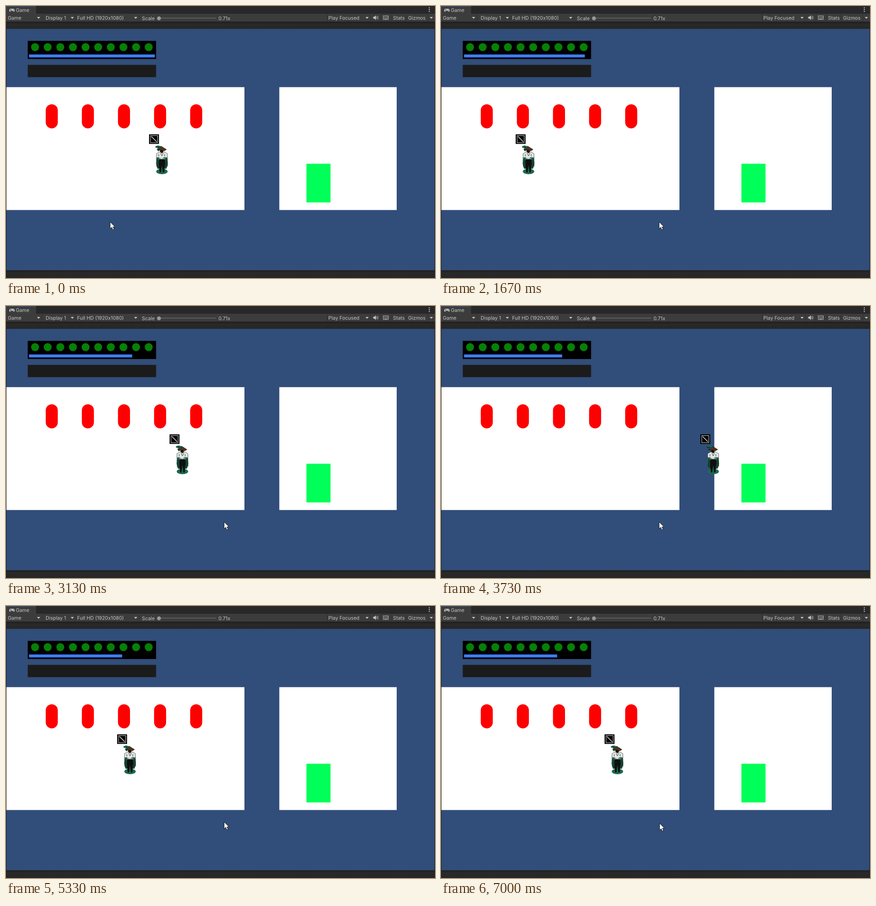
Write an HTML page that moves like this. It is 941 by 595 pixels and loops after 8000 ms.

```html
<!DOCTYPE html>
<html lang="en">
<head>
<meta charset="utf-8">
<title>Game view</title>
<style>
html, body { margin: 0; width: 100%; height: 100%; overflow: hidden; background: #282828; }
svg { display: block; width: 941px; height: 595px; }
text { font: 10.8px Inter, Roboto, sans-serif; fill: #c4c4c4; white-space: pre; }
</style>
</head>
<body>
<svg viewBox="0 0 941 595" xmlns="http://www.w3.org/2000/svg">
  <defs>
    <linearGradient id="shade" x2="0" y2="1">
      <stop offset="0" stop-color="#202020"/>
      <stop offset=".35" stop-color="#292929"/>
      <stop offset="1" stop-color="#262626"/>
    </linearGradient>
    <path id="drop" d="M-3.5 24h7l-3.5 4z" fill="#c4c4c4"/>
  </defs>

  <!-- window chrome -->
  <rect width="941" height="595" fill="#282828"/>
  <rect width="66" height="17" fill="#3c3c3c"/>
  <rect width="66" height="1" fill="#2c5d87"/>
  <rect y="17" width="941" height="17" fill="#3c3c3c"/>
  <rect y="34" width="941" height="1" fill="#232323"/>
  <rect y="35" width="941" height="15" fill="url(#shade)"/>
  <rect y="578" width="941" height="17" fill="url(#shade)"/>
  <path d="M.5 35v560M940.5 35v560" stroke="#1c1c1c"/>
  <path d="M10 6h6q2.500 0 2.800 3.500q.2 3-1.300 3q-1 0-2-2h-5q-1 2-2 2q-1.500 0-1.300-3Q7.500 6 10 6z" fill="#c4c4c4"/>
  <path d="M9 8.500h3M10.500 7v3M15 7.700h1.200M16 9.300h1.200" stroke="#3c3c3c"/>
  <path d="M928.500 4v9" stroke="#c4c4c4" stroke-width="2.400" stroke-linecap="round" stroke-dasharray="0 4"/>
  <path d="M79.500 17v17m72-17v17m141-17v17m412-17v17m95-17v17m23-17v17m23-17v17m32-17v17m48-17v17" stroke="#303030"/>
  <use href="#drop" x="71.500"/>
  <use href="#drop" x="145.500"/>
  <use href="#drop" x="284.500"/>
  <use href="#drop" x="792"/>
  <use href="#drop" x="933"/>
  <text x="21.500" y="13">Game</text>
  <text x="4" y="30">Game</text>
  <text x="87" y="30">Display 1</text>
  <text x="156" y="30">Full HD (1920x1080)</text>
  <text x="298" y="30.500">Scale</text>
  <text x="466" y="30.500">0.71x</text>
  <text x="707" y="30">Play Focused</text>
  <text x="849" y="30">Stats</text>
  <text x="882" y="30">Gizmos</text>
  <path d="M335 26.500H461" stroke="#5e5e5e" stroke-width="2"/>
  <circle cx="335.500" cy="27" r="4.300" fill="#999"/>
  <path d="M805.500 23.500h2.500l3.500-3v10l-3.500-3h-2.500z" fill="#c4c4c4"/>
  <path d="M813 23q1.500 2.500 0 5M815 21.500q2.500 4 0 8" fill="none" stroke="#c4c4c4"/>
  <rect x="827.500" y="21.500" width="11" height="8" fill="none" stroke="#b4b4b4"/>
  <path d="M829 24h9M829 26h9" stroke="#b4b4b4" stroke-dasharray="1.500 1"/>
  <path d="M830 28h6" stroke="#b4b4b4"/>

  <!-- game world -->
  <rect x="1" y="50" width="939" height="528" fill="#314d79"/>
  <rect x="1" y="177.500" width="522" height="268.800" fill="#fff"/>
  <rect x="599.500" y="177.500" width="257.500" height="268.800" fill="#fff"/>
  <rect x="659" y="345" width="52.800" height="84.700" fill="#00ff58"/>
  <g id="pills" fill="#f00"></g>
  <rect x="47.700" y="76.300" width="281.500" height="39.700" fill="#000"/>
  <rect x="47.700" y="128.800" width="281.500" height="26.800" fill="#1b1b1b"/>
  <g id="orbs" fill="#068006"></g>
  <rect id="stamina" x="50.500" y="106" width="276" height="6.500" fill="#3f7cf0"/>

  <g id="hero">
    <rect x="-.2" y="280.700" width="21.700" height="21" fill="#000"/>
    <rect x="3" y="283.500" width="15.500" height="15.500" fill="none" stroke="#dcdcdc"/>
    <path d="M5 285.500l11.500 11.500" stroke="#eee" stroke-width="1.300"/>

    <ellipse cx="28" cy="362" rx="12.500" ry="6" fill="#1d6b50"/>
    <path d="M16 328h24l1 17-3 11h-20l-3-11z" fill="#1f6b52"/>
    <g id="cape" stroke="#17231f" stroke-width="1.300"></g>
    <path d="M13 307l6-2 9 2-2 7-6 4-2-2 1-5z" fill="#147052"/>
    <path d="M14 309h8M17 313h6" stroke="#0b1a16" stroke-width="1.300"/>
    <path d="M23 313h9l-1 6-3 3-4-3z" fill="#1a1512"/>
    <path d="M18 315l9-8 11 7-5 3-6-2z" fill="#51331f" stroke="#22150d" stroke-width=".7"/>
    <path d="M16 323l7-4 5 3 5-3 7 4v9l-5-1-1 5H22l-1-5-5 1z" fill="#e4e7e6" stroke="#3b4441" stroke-width=".8"/>
    <path d="M21 324v5M34 324v5M25 322l3 6 3-6" fill="none" stroke="#333b38"/>
    <path d="M22 332l6 2 6-4v4H22z" fill="#2d8064"/>
    <path d="M22 335h12l1 9-2 20h-3l-2-16-2 16h-3l-2-20z" fill="#0d100f"/>
  </g>

  <path id="cursor" d="M.5.5v14.800l3.500-3.200 2.400 5.400 2.600-1.100-2.400-5.300h4.500z" fill="#fff" stroke="#111" stroke-width=".9"/>
</svg>
<script>
const $ = id => document.getElementById(id);
const repeat = (n, make) => Array.from({ length: n }, (_, i) => make(i)).join("");

$("pills").innerHTML = repeat(5, i =>
  `<rect x="${87.2 + i * 79.2}" y="215" width="26.400" height="52.700" rx="13.200"/>`);
$("orbs").innerHTML = repeat(10, i => `<circle cx="${63.7 + i * 27.7}" cy="90" r="8.700"/>`);
$("cape").innerHTML = repeat(6, i => {
  const side = i % 2 ? 1 : -1, off = 6 + i;
  return `<path d="M${28 + side * off} ${338 - i}l${side} 18"/>`;
});

// Game units: 15 ticks per second, speeds in pixels per tick.
const TICK = 1000 / 15, LOOP = 8000;
const START = 314, WALK = 10, SPRINT = 29.6;
const DOOR = { tick: 52, shift: 41.6 }, RETURN = { tick: 61, shift: -198 };

// Keys held: from tick, to tick, direction, speed.
const moves = [
  [14, 14.6, -1, WALK],
  [20.15, 29, -1, SPRINT],
  [29, 32, -1, WALK],
  [32.3, 36, 1, WALK],
  [36, 46, 1, SPRINT],
  [46, 47, 1, WALK],
  [47, 51, 1, SPRINT],
  [51, 56, 1, WALK],
  [64, 67, 1, WALK],
  [69, 72, -1, WALK],
  [72, 76.9, -1, SPRINT],
  [76.9, 77.3, -1, WALK],
  [77.8, 91.55, 1, WALK]
];

const clamp = (v, lo, hi) => Math.min(hi, Math.max(lo, v));

function heroAt(tick) {
  let x = START, stamina = 100;
  for (const [from, to, dir, speed] of moves) {
    const held = clamp(tick - from, 0, to - from);
    x += dir * speed * held;
    if (speed === SPRINT) stamina -= Math.floor(held + 1e-6);
  }
  for (const warp of [DOOR, RETURN]) if (tick >= warp.tick) x += warp.shift;
  return { x, stamina };
}

// One wide arc to the right, then a small dip near the end.
function cursorAt(tick) {
  const s = clamp(tick / 13, 0, 1), ease = s * s * (3 - 2 * s);
  const n = clamp((tick - 101) / 4, 0, 1);
  return [228 + 250 * ease + n,
    472 - 143 * Math.sin(Math.PI * ease) + 3 * n - 6 * Math.sin(Math.PI * n)];
}

const place = (id, x, y) =>
  $(id).setAttribute("transform", `translate(${Math.round(x)} ${Math.round(y)})`);

const start = performance.now();
function draw(now) {
  const t = Math.max(0, now - start) % LOOP;
  const tick = Math.floor((t + 4) / TICK) % 120;
  const hero = heroAt(tick);
  place("hero", hero.x, 0);
  place("cursor", ...cursorAt(tick));
  $("stamina").setAttribute("width", 2.76 * hero.stamina);
  requestAnimationFrame(draw);
}
draw(start);
</script>
</body>
</html>
```
